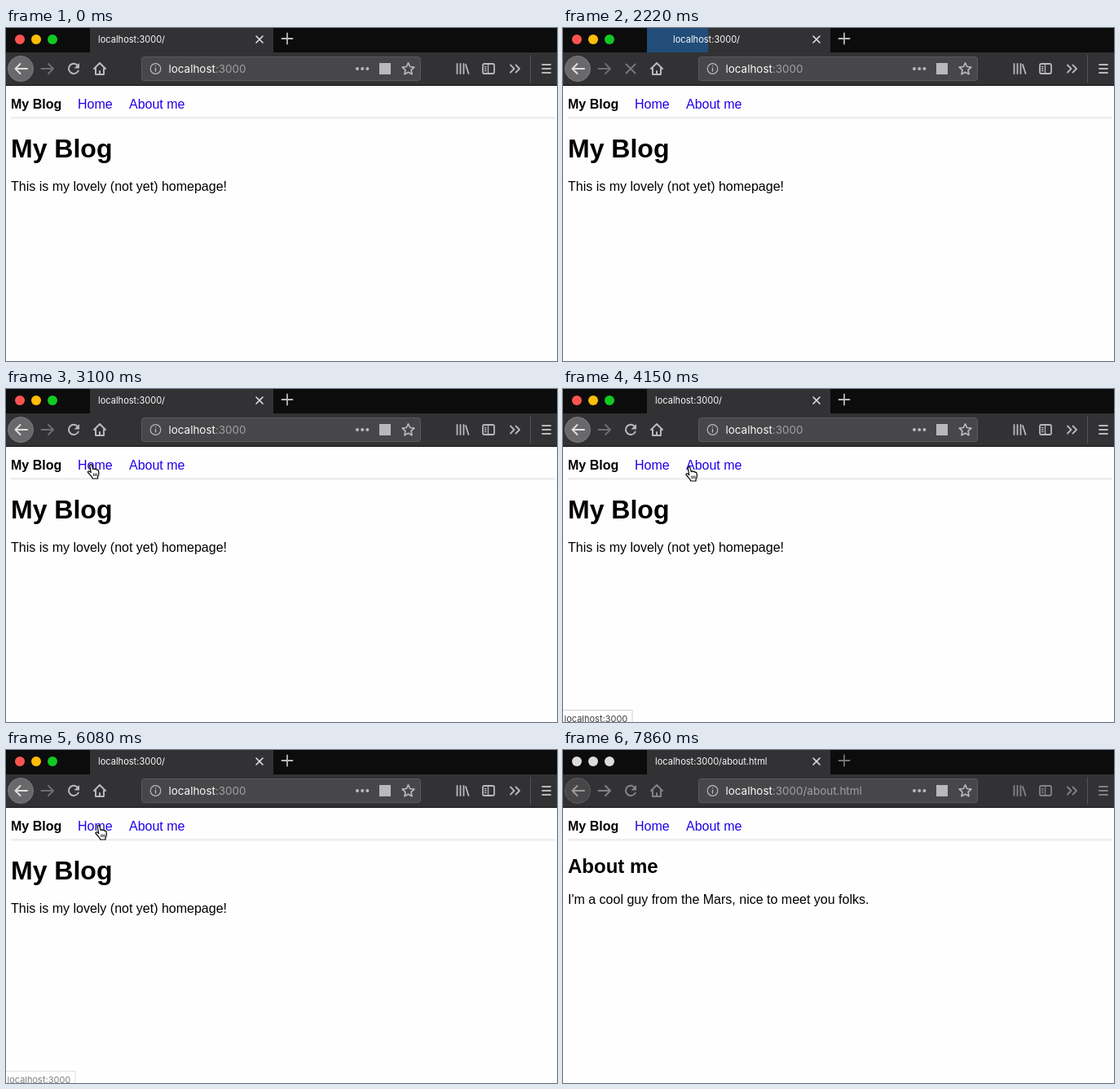
Write an HTML page that moves like this. It is 676 px wide and 409 px high and loops after 7960 ms.

```html
<!DOCTYPE html>
<html lang="en">
<head>
<meta charset="utf-8">
<title>Blog navigation</title>
<style>
  html, body { margin: 0; width: 100%; height: 100%; overflow: hidden; background: #fefefe; }
  svg { display: block; width: 676px; height: 409px; }
  text { white-space: pre; }
  .page { font-family: "Liberation Sans", Arial, sans-serif; font-size: 16px; fill: #000; }
  .bold { font-weight: bold; }
  .ui { font-family: Inter, "Noto Sans CJK SC", "Noto Sans CJK", sans-serif; }
  .line { fill: none; stroke: #b9b9bb; stroke-width: 2; stroke-linecap: round; stroke-linejoin: round; }
</style>
</head>
<body>
<svg viewBox="0 0 676 409">
  <rect width="676" height="409" fill="#fefefe"/>

  <g class="page">
    <text class="bold" x="6" y="98.5">My Blog</text>
    <g fill="#2000e8">
      <text x="88" y="98.5">Home</text>
      <text x="151" y="98.5">About me</text>
    </g>
    <rect x="6" y="109" width="668" height="2.6" fill="#eee"/>
    <g id="home">
      <text class="bold" x="6" y="159" font-size="32">My Blog</text>
      <text x="6" y="200">This is my lovely (not yet) homepage!</text>
    </g>
    <g id="about">
      <text class="bold" x="6" y="150.5" font-size="24">About me</text>
      <text x="6" y="189">I'm a cool guy from the Mars, nice to meet you folks.</text>
    </g>
  </g>

  <!-- tab strip -->
  <rect width="676" height="30" fill="#0c0c0d"/>
  <rect x="103" width="225" height="30" fill="#323234"/>
  <rect id="burst" x="103" height="30" fill="#214d78"/>
  <g id="lights">
    <circle cx="17" cy="14" r="6"/><circle cx="37" cy="14" r="6"/><circle cx="57" cy="14" r="6"/>
  </g>
  <circle id="dot" cy="14" r="2.2" fill="#a8a8aa"/>
  <text id="title" class="ui" y="18" font-size="11.05" fill="#f9f9fa"></text>
  <path class="line" d="M307 10l8 8m0-8l-8 8" style="stroke:#e4e4e6;stroke-width:1.6"/>

  <!-- toolbar -->
  <rect y="30" width="676" height="40" fill="#323234"/>
  <rect y="70" width="676" height="1" fill="#0c0c0d"/>
  <g id="tools">
    <path class="line" d="M338.5 13h13M345 6.500v13" style="stroke-width:1.8"/>
    <circle id="disc" cx="18" cy="50" r="15.5" fill="#69696b" stroke="#7b7b7d"/>
    <path class="line" d="M26 50H11.500m6-6l-6 6l6 6" style="stroke:#dededf"/>
    <path id="fwd" class="line" d="M43.500 50H58m-6-6l6 6l-6 6"/>
    <g id="reload">
      <path class="line" d="M88.200 46.300A6.200 6.200 0 1 0 88.700 52.600"/>
      <path d="M90 43v6.500h-6.500z" fill="#b9b9bb"/>
    </g>
    <path id="stop" class="line" d="M77.500 44.500l11 11m0-11l-11 11" style="stroke:#77777a"/>
    <path class="line" d="M108 50l7-7l7 7M110 49.500V57h10V49.500M115 57v-4"/>
    <g class="line">
      <path d="M553.500 44v12M557.500 44v12M561.500 44v12M564 45l3.500 11" style="stroke-width:1.8"/>
      <rect x="585" y="44" width="14" height="12" rx="2" style="stroke-width:1.8"/>
      <path d="M591.500 44v12M587.500 47.500h1.500m-1.500 2.500h1.500m-1.500 2.500h1.500" style="stroke-width:1.3"/>
      <path d="M619 45.500l4.500 4.500l-4.500 4.500M625.500 45.500l4.500 4.500l-4.500 4.500" style="stroke-width:1.800"/>
      <path d="M658 45h10m-10 5h10m-10 5h10" style="stroke-width:1.8"/>
    </g>
  </g>
  <rect x="643" y="33" width="1" height="34" fill="#545456"/>

  <!-- address field -->
  <rect x="166.500" y="35.500" width="342" height="29" rx="3" fill="#474749" stroke="#5a5a5c"/>
  <circle class="line" cx="183.500" cy="50" r="6.300" style="stroke-width:1.2"/>
  <path class="line" d="M183.500 49.500v3.500M183.500 46.700v.1" style="stroke-width:1.4"/>
  <text class="ui" x="199.500" y="55" font-size="13.45" fill="#f9f9fa">localhost<tspan id="path" fill="#a0a0a2"></tspan></text>
  <g fill="#b9b9bb">
    <circle cx="431" cy="50" r="2"/><circle cx="437.200" cy="50" r="2"/><circle cx="443.400" cy="50" r="2"/>
    <rect x="458" y="43" width="14" height="14"/>
  </g>
  <path id="star" class="line" style="stroke-width:1.7"/>

  <g id="status">
    <rect id="statusBox" x="-1" y="394.500" height="16" fill="#fff" stroke="#cfcfcf"/>
    <text id="statusText" class="ui" x="1.500" y="408.500" font-size="11" fill="#3c3c3e"></text>
  </g>

  <path id="arrow" d="M0 0V16L3.700 12.600L6 18L8.600 17L6.300 11.600H11.400Z" stroke="#fff"/>
  <g id="hand" stroke="#000" stroke-width="1.2" stroke-linejoin="round">
    <path fill="#fff" d="M3.200 1.800C3.400 .4 5.300 .2 5.900 1.600L7.300 6.600C7.800 5.600 9.300 5.600 9.700 6.800C10.200 6 11.600 6.200 11.900 7.400C12.600 6.900 13.800 7.300 14 8.400L14.400 12C14.400 13.600 13.400 14.600 13 16V18H6.600L6 16.200C4.400 14.600 3 12.500 1 10.500C.4 9.200 2.200 8.300 3.300 9.400L4.700 10.600Z"/>
    <path fill="none" stroke-width=".9" d="M7.900 11.500v3.500M9.900 11.500v3.500M11.900 11.500v3.500"/>
  </g>
</svg>
<script>
const LOOP = 7960;
const $ = id => document.getElementById(id);
const HOST = "localhost:3000", ABOUT = "/about.html";

const arrow = (x, y) => ({ cursor: "arrow", x, y });
const hand = (x, y) => ({ cursor: "hand", x, y });
const gone = { cursor: "" };
const status = (text, width, fade = 1) => ({ status: text, width, fade });
const noStatus = status("", 0);
const homeLink = status(HOST, 86), aboutLink = status(HOST + ABOUT, 146);

const start = {
  ...gone, ...noStatus, page: "home", url: "/", busy: false, dot: 0,
  burst: 0, glow: 1, button: "reload", spin: 0, forward: false, focus: true, press: false
};

// Each cue changes part of the state and holds until the next one.
const cues = [
  [1340, arrow(0.5, 210)],
  [1490, arrow(-4, 231)],
  [1640, gone],
  [1930, { ...status("等待 localhost...", 213), busy: true, dot: 116.5, spin: 25 }],
  [2080, { dot: 122, button: "stop", spin: 0 }],
  [2220, { ...noStatus, dot: 0, burst: 75 }],
  [2370, { burst: 176, glow: 0.4 }],
  [2520, { burst: 0, busy: false }],
  [2670, { button: "reload", spin: -40 }],
  [2810, { spin: 0 }],
  [2960, arrow(80, 75)],
  [3100, hand(99.5, 92)],
  [3250, { ...hand(99.5, 93), ...status(HOST, 86, 0.5) }],
  [3400, homeLink],
  [4150, hand(150, 95)],
  [4300, { ...hand(172.5, 95), ...aboutLink }],
  [4600, { url: ABOUT }],
  [4740, { page: "about" }],
  [5190, hand(130, 94)],
  [5340, { ...hand(109, 92), ...homeLink }],
  [6080, { page: "home", url: "/", ...status(HOST, 86, 0.65) }],
  [6230, { ...arrow(66, 74), ...noStatus }],
  [6370, arrow(28, 54)],
  [6520, arrow(15, 48)],
  [6810, { press: true }],
  [6960, { press: false, page: "about", url: ABOUT, forward: true }],
  [7110, arrow(60, 84)],
  [7260, arrow(300, 220)],
  [7410, arrow(634, 385)],
  [7560, gone],
  [7860, { focus: false }]
];

const stateAt = t =>
  cues.reduce((s, [at, change]) => at <= t ? Object.assign(s, change) : s, { ...start });

const set = (id, attrs) => {
  for (const key in attrs) $(id).setAttribute(key, attrs[key]);
};
const show = (id, on) => set(id, { visibility: on ? "visible" : "hidden" });

function starPath(cx, cy) {
  const points = Array.from({ length: 10 }, (_, i) => {
    const r = i % 2 ? 3.7 : 7.7, a = i * Math.PI / 5;
    return `${cx + r * Math.sin(a)} ${cy - r * Math.cos(a)}`;
  });
  return `M${points.join("L")}Z`;
}

function draw(t) {
  const s = stateAt(t);
  show("home", s.page === "home");
  show("about", s.page === "about");
  $("title").textContent = HOST + s.url;
  set("title", { x: s.busy ? 135 : 113 });
  $("path").textContent = ":3000" + (s.url === "/" ? "" : s.url);
  show("dot", s.dot > 0);
  set("dot", { cx: s.dot });
  set("burst", { width: s.burst, opacity: s.glow });

  show("reload", s.button === "reload");
  show("stop", s.button === "stop");
  set("reload", { transform: `rotate(${s.spin} 83 50)` });
  set("fwd", { opacity: s.forward ? 1 : 0.45 });
  set("tools", { opacity: s.focus ? 1 : 0.6 });
  set("disc", { fill: s.press ? "#858587" : s.focus ? "#69696b" : "#555557" });
  const colors = s.focus ? ["#ff5350", "#ffbd05", "#11c923"] : Array(3).fill("#dcdcdc");
  [...$("lights").children].forEach((c, i) => c.setAttribute("fill", colors[i]));

  show("status", s.status);
  set("status", { opacity: s.fade });
  set("statusBox", { width: s.width });
  $("statusText").textContent = s.status;

  for (const id of ["arrow", "hand"]) {
    show(id, s.cursor === id);
    if (s.cursor === id) set(id, { transform: `translate(${s.x} ${s.y})` });
  }
}

set("star", { d: starPath(493.5, 50.5) });
const begin = performance.now();
function tick() {
  draw((performance.now() - begin) % LOOP);
  requestAnimationFrame(tick);
}
tick();
</script>
</body>
</html>
```
